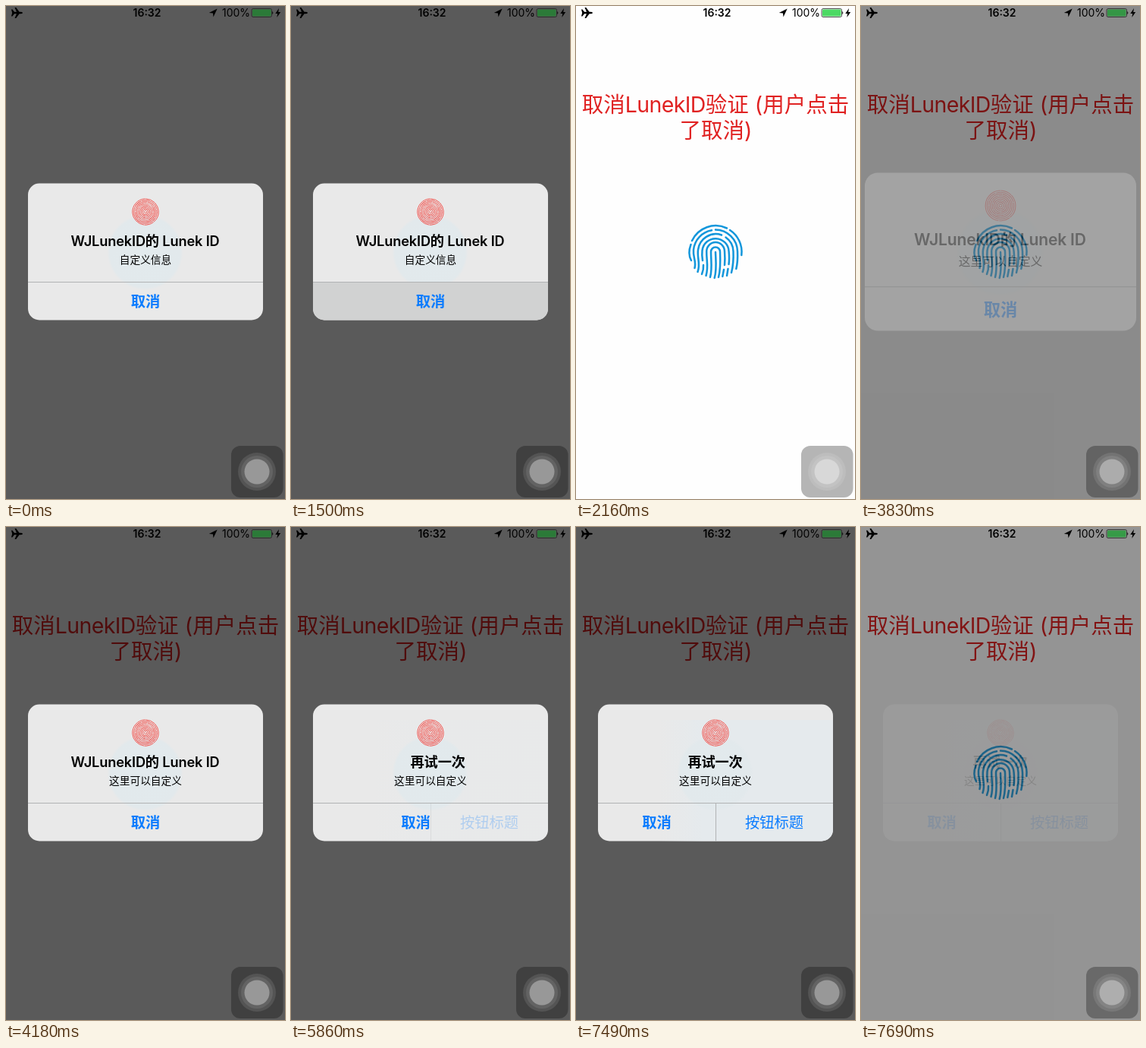
An HTML page for the animation above (8 s loop, 368 px wide and 649 px high).

```html
<!DOCTYPE html>
<html lang="zh-CN">
<head>
<meta charset="utf-8">
<title>Fingerprint unlock</title>
<style>
  html, body { margin: 0; width: 100%; height: 100%; overflow: hidden; background: #fefefe; }
  svg { display: block; width: 100%; height: 100%; }
  text { font-family: Inter, "Noto Sans CJK SC", "Noto Sans CJK", sans-serif; text-anchor: middle; }
  .headline { font-size: 28.5px; fill: #e02222; }
  .latin { letter-spacing: -.6px; }
  .title { font-size: 18.2px; font-weight: 600; letter-spacing: -.15px; }
  .note { font-size: 13.7px; }
  .action { font-size: 19.3px; fill: #0a7cff; }
  .strong { font-weight: 600; }
  .bar { font-size: 14px; }
  .ridges path, .whorl circle { fill: none; stroke-linecap: round; }
</style>
</head>
<body>
<svg viewBox="0 0 368 649">
  <defs>
    <radialGradient id="glow">
      <stop offset="0" stop-color="#e2eaed"/>
      <stop offset=".93" stop-color="#e2e9ec"/>
      <stop offset="1" stop-color="#e2e9ec" stop-opacity="0"/>
    </radialGradient>
    <linearGradient id="tint">
      <stop offset="0" stop-color="#e5eaed" stop-opacity="0"/>
      <stop offset=".25" stop-color="#e5eaed"/>
      <stop offset="1" stop-color="#e5eaed"/>
    </linearGradient>
    <clipPath id="card"><rect x="29" y="233.5" width="310" height="180" rx="15"/></clipPath>
  </defs>
  <rect width="368" height="649" fill="#fefefe"/>

  <g id="headline" class="headline">
    <text x="184" y="140">取消<tspan class="latin">LunekID</tspan>验证 (用户点击</text>
    <text x="184.5" y="174">了取消)</text>
  </g>

  <g id="finger" class="ridges" stroke-width="2.5">
    <path d="M153 309A34.5 34.5 0 0 1 199 292.5"/>
    <path d="M203 295A34.5 34.5 0 0 1 218.3 328"/>
    <path d="M151.5 314Q147 326 152 335"/>
    <path d="M156.500 345C159 336 154 331 155 321A29 29 0 0 1 179 295.300"/>
    <path d="M184 294.500A29.300 29.300 0 0 1 213 323C213.500 333 213 339 211.300 346"/>
    <path d="M160.500 350C164.500 339 159.500 332 161 321A23.500 23.500 0 0 1 192 301.500"/>
    <path d="M197.500 304.500A23.500 23.500 0 0 1 207.500 323C208 334 207.500 341 205 351"/>
    <path d="M166 353Q168.500 347 168 341M167 335Q165.800 328 166.500 322A17.600 17.600 0 0 1 201.600 323Q202.500 333 201.500 340M200.500 346L199 355"/>
    <path d="M171.500 355C175 344 172 335 172.200 323A11.900 11.900 0 0 1 196 323Q196.800 333 196 341M195 347L193.300 356"/>
    <path d="M177 357C180 346 178 335 178 323.500A6 6 0 0 1 190 323.500C190.500 335 191 346 188 357"/>
    <path d="M184 324C184.300 335 186 346 182.700 358"/>
  </g>

  <rect id="dim" width="368" height="649"/>

  <g id="alert">
    <g clip-path="url(#card)">
      <rect x="29" y="233" width="310" height="181" fill="#e9e9e9"/>
      <rect id="wash" x="110" y="254" width="229" height="160" fill="url(#tint)"/>
      <circle cx="183.500" cy="324" r="50" fill="url(#glow)"/>
      <rect id="pressed" x="29" y="363" width="310" height="51" fill="#d1d2d2"/>
      <path d="M29 363.500H339" stroke="#b1b3b4"/>
      <path id="split" d="M184.500 364V414" stroke="#b1b3b4"/>
    </g>
    <g id="whorl" class="whorl" stroke="#f2544f" stroke-width=".95"></g>
    <text id="title" class="title" x="183.500" y="316.300"></text>
    <text id="note" class="note" x="184" y="339.200"></text>
    <text id="cancel" class="action strong" y="396.300">取消</text>
    <text id="retry" class="action" x="261.500" y="396.300">按钮标题</text>
  </g>

  <g class="bar">
    <path d="M7 4.500H8.500L11 7.800H14L11.500 2H13.300L17.600 7.800H20Q22 8.200 22 9Q22 9.800 20 10.200H17.600L13.300 16H11.500L14 10.200H11L8.500 13.500H7L8.200 9Z"/>
    <text x="186" y="14" class="strong">16:32</text>
    <path d="M278.700 3.500L267.800 8.900L273 9.500L273.500 14.600Z"/>
    <text x="303.500" y="14">100%</text>
    <rect x="324" y="3.500" width="26.500" height="11" rx="2" fill="none" stroke="#222" stroke-width=".8"/>
    <rect id="charge" x="325" y="4.500" width="24.500" height="9" rx="1"/>
    <path d="M351.300 7Q353.300 9 351.300 11Z"/>
    <path d="M360 3L355.300 9.900H358.200L357.300 15L362.200 8H359.200Z"/>
  </g>

  <g fill="#fff">
    <rect x="297" y="579" width="68.500" height="68" rx="12" fill="#000" fill-opacity=".29"/>
    <circle cx="331" cy="613" r="25" fill-opacity=".1"/>
    <circle cx="331" cy="613" r="21" fill-opacity=".09"/>
    <circle cx="331" cy="613" r="16.500" fill-opacity=".34"/>
  </g>
</svg>
<script>
const LOOP = 8000;
const $ = id => document.getElementById(id);
const set = (id, attrs) => {
  for (const key in attrs) $(id).setAttribute(key, attrs[key]);
};
const write = (id, text) => {
  if ($(id).textContent !== text) $(id).textContent = text;
};
const mix = (a, b, p) => a + (b - a) * p;
const clamp = x => Math.max(0, Math.min(1, x));
const easeOut = p => 1 - (1 - p) ** 2;

// Progress held on n evenly spaced steps, from 0 at start to 1 at end.
const stepped = (t, start, end, n) =>
  clamp(Math.floor((t - start) / (end - start) * (n - 1) + 1e-6) / (n - 1));

function drawWhorl() {
  let out = '';
  for (let i = 0; i < 9; i++) {
    const r = 1.6 + i * 1.95, gap = .9 + i * .05;
    out += `<circle cx="184" cy="271" r="${r}" stroke-dasharray="${r * 1.6} ${gap} ${r * .7} ${gap}"
      transform="rotate(${i * 67} 184 271)"/>`;
  }
  $('whorl').innerHTML = out;
}

// Dim level, dialog opacity and dialog scale.
function dialog(t) {
  const leave = p => ({ dim: mix(.645, .42, p), alpha: mix(1, .09, p), scale: 1 });
  if (t < 1810) return leave(stepped(t, 1500, 1810, 5));
  if (t < 2040) return leave(1);
  if (t < 3830) return { dim: t < 2160 ? .12 : 0, alpha: 0, scale: 1 };
  if (t < 7430) {
    const p = easeOut(stepped(t, 3830, 4180, 5));
    return { dim: mix(.455, .645, p), alpha: mix(.255, 1, p), scale: mix(1.155, 1, p) };
  }
  return leave(stepped(t, 7430, 7690, 4));
}

function render(t) {
  const { dim, alpha, scale } = dialog(t);
  const failed = t >= 5860;
  const shake = stepped(t, 5860, 6670, 11);
  const split = failed ? clamp(shake * 2.5 + .25) : 0;
  const light = 1 - .68 * dim;

  set('headline', { visibility: t >= 2040 ? 'visible' : 'hidden' });
  set('finger', { stroke: t >= 3530 && t < 3830 ? '#0a5580' : '#1296db' });
  set('dim', { 'fill-opacity': dim });
  set('charge', { fill: `rgb(${[76, 217, 100].map(c => Math.round(c * light))})` });

  set('alert', {
    opacity: alpha,
    transform: `translate(184 323.5) scale(${scale}) translate(-184 -323.5)`
  });
  set('pressed', { opacity: t >= 1500 && t < 2160 ? 1 : 0 });
  set('wash', { opacity: split });
  set('split', { opacity: split });
  set('retry', { opacity: split });
  set('cancel', { x: mix(184, 106.5, split) });

  write('title', failed ? '再试一次' : 'WJLunekID的 Lunek ID');
  write('note', t < 2160 ? '自定义信息' : '这里可以自定义');
  const sway = failed ? 18 * Math.sin(shake * 8 * Math.PI + .6) * (1 - shake) ** 1.5 : 0;
  set('title', { x: 183.5 + sway });
}

drawWhorl();
const begin = performance.now();
function tick() {
  render((performance.now() - begin) % LOOP);
  requestAnimationFrame(tick);
}
tick();
</script>
</body>
</html>
```
